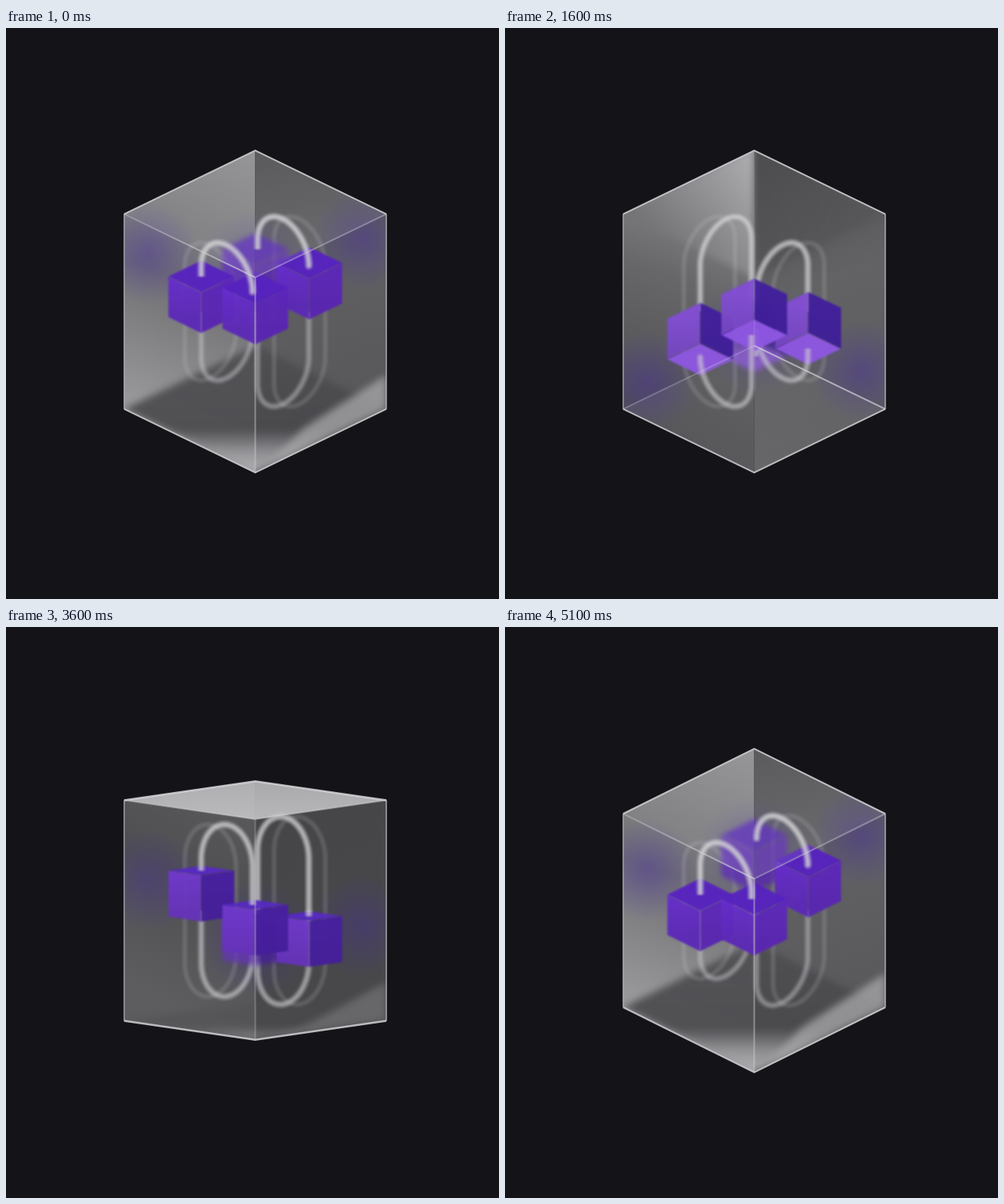
Animation, 630 px wide and 730 px high, one loop 5.2 s. Source, as an HTML page with a canvas:

```html
<!DOCTYPE html>
<html lang="en">
<head>
<meta charset="utf-8">
<title>Glass cube</title>
<style>
  html, body { margin: 0; width: 100%; height: 100%; overflow: hidden; background: #141318; }
  canvas { display: block; }
</style>
</head>
<body>
<canvas id="stage" width="630" height="730"></canvas>
<script>
const ctx = document.getElementById('stage').getContext('2d');
const LOOP = 5200, STEP = 100, HALF_TURN = 2687, FIRST_CROSSING = 800;
const CX = 318.5, CY = 362.5, W = 167.5, H = 142.5;
const ORBIT = 69, CUBE_W = 42, CUBE_H = 29.7, BOB = 45;
const ROD_H = 116, ROD_R = 49;

const cubes = {
  left:  { x: -ORBIT, d: 0, phase: 0.5 },
  front: { x: 0, d: ORBIT, phase: 1.28 },
  right: { x: ORBIT, d: 0, phase: 1.97 },
  back:  { x: 0, d: -ORBIT, phase: 2.6 }
};
const rods = [
  { a: cubes.back, b: cubes.right, xa: 3, xb: 68.5, ghost: 21 },
  { a: cubes.left, b: cubes.front, xa: -69, xb: -3.5, ghost: -21 }
];

let cos, sin, tilt, above, below;

const clamp = v => Math.max(0, Math.min(1, v));
const gray = (v, a = 1) => `rgba(${v | 0},${v | 0},${(v + 3) | 0},${a})`;
const project = (x, y, d) => [CX + x, CY + y * cos + d * sin];
const blend = (flat, up, down) => flat + (up - flat) * above + (down - flat) * below;

// Degrees: positive looks down on the cube, negative looks up at it.
function tiltAt(t) {
  const n = Math.round((t - FIRST_CROSSING) / HALF_TURN);
  const off = t - FIRST_CROSSING - n * HALF_TURN;
  return (n % 2 ? 30 : -30) * Math.tanh(off / 395);
}

function trace(points, close = true) {
  ctx.beginPath();
  points.forEach(p => ctx.lineTo(p[0], p[1]));
  if (close) ctx.closePath();
}

function fill(points, style) {
  trace(points);
  ctx.fillStyle = style;
  ctx.fill();
}

function line(points, style, width) {
  trace(points, false);
  ctx.strokeStyle = style;
  ctx.lineWidth = width;
  ctx.stroke();
}

function ramp(p, q, stops) {
  const g = ctx.createLinearGradient(p[0], p[1], q[0], q[1]);
  stops.forEach(([at, color]) => g.addColorStop(at, color));
  return g;
}

function blurred(radius, alpha, draw) {
  ctx.save();
  ctx.filter = radius ? `blur(${radius}px)` : 'none';
  ctx.globalAlpha = alpha;
  draw();
  ctx.restore();
}

const corner = (name, y) => project(
  { left: -W, right: W }[name] || 0, y, { front: W, back: -W }[name] || 0);

const cap = y => ['left', 'back', 'right', 'front'].map(n => corner(n, y));

function outline() {
  const reach = H * cos + W * Math.abs(sin);
  return [[CX, CY - reach], corner('right', -H), corner('right', H),
    [CX, CY + reach], corner('left', H), corner('left', -H)];
}

function drawWalls(hex) {
  const [top, rt, rb, bottom, lb, lt] = hex;
  const shades = (flat, up, down) => flat.map((v, i) =>
    [i / 2, gray(blend(v, up[i], down[i]))]);
  fill([top, bottom, lb, lt], ramp([CX, top[1]], [190, bottom[1] - 60],
    shades([72, 65, 68], [148, 112, 158], [158, 104, 78])));
  fill([top, rt, rb, bottom], ramp([CX, top[1]], [445, bottom[1] - 60],
    shades([64, 62, 66], [84, 96, 88], [76, 100, 92])));
}

function drawFloor() {
  const k = clamp(above * 1.5);
  const front = corner('front', H), back = corner('back', H);
  blurred(5, k * 0.9, () => {
    fill(cap(H), ramp(back, front,
      [[0, gray(78)], [0.66, gray(72)], [0.84, gray(150)], [1, gray(180)]]));
    fill([project(W, H - 50, 0), project(W, H, 0), project(10, H, W - 10), project(62, H, 50)],
      gray(168, 0.85));
  });
}

function drawCeiling(glow) {
  const k = clamp(below * 1.5);
  const front = corner('front', -H), back = corner('back', -H);
  const left = corner('left', -H), right = corner('right', -H);
  blurred(4, k, () => {
    fill([left, front, back], ramp(front, left,
      [[0, gray(182, 0.75)], [0.6, gray(140, 0.5)], [1, gray(105, 0.35)]]));
    fill([right, front, back], ramp(front, right,
      [[0, gray(78 + glow * 58, 0.7)], [1, gray(84 + glow * 34, 0.5)]]));
  });
}

function haze(x, y, r, alpha) {
  const g = ctx.createRadialGradient(x, y, 0, x, y, r);
  g.addColorStop(0, `rgba(72,42,165,${alpha})`);
  g.addColorStop(1, 'rgba(72,42,165,0)');
  ctx.fillStyle = g;
  ctx.fillRect(x - r, y - r, 2 * r, 2 * r);
}

function rodHalf(rod, side, start = [0, 0], shift = 0) {
  const bend = ROD_H - ROD_R, pts = [];
  const put = (u, y) => {
    const x = rod.xa + (rod.xb - rod.xa) * u;
    const d = rod.a.d + (rod.b.d - rod.a.d) * u;
    pts.push([CX + x + shift, CY + side * (y * cos - d * sin)]);
  };
  for (let i = 0; i <= 32; i++) {
    const a = Math.PI * i / 32;
    put((1 - Math.cos(a)) / 2, bend + ROD_R * Math.sin(a));
  }
  pts.unshift([pts[0][0], CY + start[0]]);
  pts.push([pts[pts.length - 1][0], CY + start[1]]);
  return pts;
}

function drawRod(rod, side, start) {
  const pts = rodHalf(rod, side, start);
  const alpha = side < 0 ? 0.66 + 0.14 * above : 0.58 - 0.22 * above - 0.06 * below;
  blurred(1.3, alpha, () => {
    ctx.lineJoin = 'round';
    line(pts, gray(190, 0.55), 10);
    line(pts, gray(222, 0.75), 5);
  });
}

function drawGhosts() {
  rods.forEach(rod => [-1, 1].forEach(side => blurred(1.6, 0.17, () =>
    line(rodHalf(rod, side, [0, 0], rod.ghost), gray(205), 6))));
}

function drawNearRod(rod, side) {
  const face = c => c.y - CY + side * CUBE_H * cos;
  drawRod(rod, side, [face(rod.a), face(rod.b)]);
}

function drawCube(c, dim) {
  const at = (x, y, d) => [CX + c.x + x, c.y + y * cos + d * sin];
  const tone = (flat, up, down) =>
    `rgb(${flat.map((v, i) => blend(v, up[i], down[i]) | 0)})`;
  const y = CUBE_H, w = CUBE_W;
  const side = (x, flat, up, down, fade) => fill(
    [at(0, -y, w), at(x, -y, 0), at(x, y, 0), at(0, y, w)],
    ramp(at(0, -y, 0), at(0, y, 0),
      [[0, tone(flat, up, down)], [1, tone(...[flat, up, down].map(k => k.map(v => v * fade)))]]));
  blurred(dim ? 3 : 0.8, dim ? 0.75 : 0.96, () => {
    const end = tilt >= 0 ? -y : y;
    fill([at(-w, end, 0), at(0, end, w), at(w, end, 0), at(0, end, -w)],
      tone([88, 45, 195], [87, 35, 192], [143, 88, 226]));
    side(-w, [116, 62, 206], [103, 46, 204], [130, 78, 212], 0.9);
    side(w, [64, 29, 152], [94, 40, 188], [66, 32, 158], 0.95);
  });
}

function drawContents() {
  const side = tilt >= 0 ? -1 : 1;
  [cubes.left, cubes.right].forEach((c, i) =>
    haze(i ? 455 : 182, c.y - 115 * sin, 65, 0.3 + 0.2 * Math.abs(sin)));
  haze(CX, cubes.back.y, 75, 0.3);
  drawGhosts();
  rods.forEach(rod => drawRod(rod, -side));
  drawCube(cubes.back, true);
  drawCube(cubes.right);
  drawNearRod(rods[0], side);
  drawCube(cubes.left);
  drawCube(cubes.front);
  drawNearRod(rods[1], side);
}

function drawCap(glow) {
  const y = tilt >= 0 ? -H : H;
  const far = corner(tilt >= 0 ? 'back' : 'front', y);
  const near = corner(tilt >= 0 ? 'front' : 'back', y);
  const light = tilt >= 0 ? 206 : 176;
  fill(cap(y), ramp(far, near, [
    [0, gray(light - 8, 0.06 + 0.72 * glow)],
    [1, gray(light, 0.13 + 0.7 * glow)]]));
}

function drawEdges(hex) {
  const [top, rt, rb, bottom, lb, lt] = hex;
  const flat = 1 - clamp(Math.abs(tilt) / 12);
  const y = tilt >= 0 ? -H : H;
  const front = corner('front', y), other = corner('front', -y);
  const left = corner('left', y), right = corner('right', y);
  blurred(0.5, 1, () => {
    line([front, other], gray(205, tilt >= 0 ? 0.3 + 0.2 * above : 0.3 - 0.15 * below), 2);
    line([left, front], ramp(left, front,
      [[0, gray(205, 0.35)], [1, gray(215, 0.38 + 0.3 * above - 0.15 * below)]]), 2);
    line([front, right], gray(215, 0.4 + 0.3 * below), 2);
    line([lt, lb], gray(190, 0.65), 1.8);
    line([rt, rb], gray(195, 0.7), 1.8);
    line([lt, top, rt], gray(216, 0.85), 2 + 1.6 * flat);
    line([lb, bottom, rb], gray(212, 0.85), 2 + 1.6 * flat);
  });
}

function render(t) {
  tilt = tiltAt(t);
  cos = Math.cos(tilt * Math.PI / 180);
  sin = Math.sin(tilt * Math.PI / 180);
  above = clamp(tilt / 29);
  below = clamp(-tilt / 29);
  for (const c of Object.values(cubes)) {
    const lift = BOB * Math.sin(c.phase + t * 2 * Math.PI / HALF_TURN);
    c.y = project(0, -lift, c.d)[1];
  }
  const glow = clamp((29 - Math.abs(tilt)) / 5);
  const hex = outline();
  ctx.fillStyle = '#141318';
  ctx.fillRect(0, 0, 630, 730);
  ctx.save();
  trace(hex);
  ctx.clip();
  drawWalls(hex);
  if (tilt > 0) drawFloor();
  else drawCeiling(glow);
  drawContents();
  drawCap(glow);
  ctx.restore();
  drawEdges(hex);
}

function tick() {
  const t = performance.now() % LOOP;
  render(Math.floor(t / STEP) * STEP);
  requestAnimationFrame(tick);
}
tick();
</script>
</body>
</html>
```
